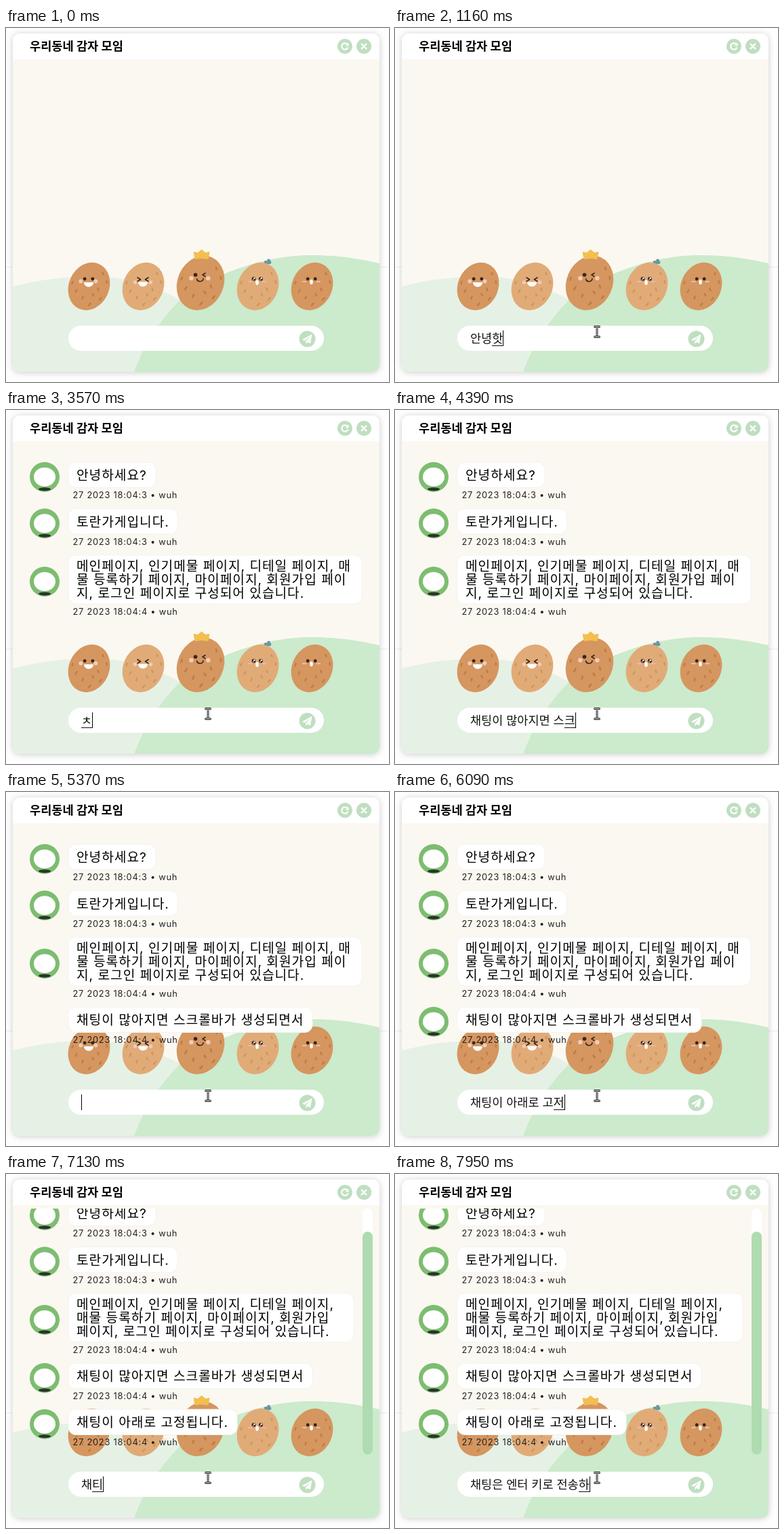
These frames come from a looping animation (565 px wide and 522 px high, 8 s). An HTML page:

```html
<!DOCTYPE html>
<html lang="ko">
<head>
<meta charset="utf-8">
<title>우리동네 감자 모임</title>
<style>
  html, body { margin: 0; width: 100%; height: 100%; overflow: hidden; background: #fefefe; }
  body { position: relative; font-family: Inter, "Noto Sans CJK KR", "Noto Sans CJK", sans-serif; }
  svg { position: absolute; left: 0; top: 0; display: block; }
  .title { font-size: 17.6px; font-weight: 700; }
  .message { font-size: 19.2px; letter-spacing: .05em; }
  .time { font-size: 12.8px; letter-spacing: .06em; fill: #222; }
  .panel { filter: drop-shadow(0 1px 5px rgba(0, 0, 0, .2)); }
  #entry {
    position: absolute; left: 111px; top: 446px; width: 316px; height: 23px;
    display: flex; overflow: hidden; white-space: pre;
    font-size: 17.5px; line-height: 23px; color: #111;
  }
  #entry span { flex: none; height: 23px; box-sizing: border-box; }
  #composing { border-bottom: 1px solid #111; }
  #caret { width: 1px; background: #000; }
</style>
</head>
<body>
<svg width="565" height="522" viewBox="0 0 565 522">
  <defs>
    <clipPath id="panelClip"><rect x="10" y="8" width="541" height="499" rx="11"/></clipPath>
    <clipPath id="chatClip"><rect x="10" y="51" width="541" height="363"/></clipPath>
    <ellipse id="potato" rx="29.800" ry="36.200" transform="rotate(24)"/>
    <path id="specks" fill="none" stroke-width="2.400" stroke-linecap="round"
      d="M-24,-7l-1,3M-18,5l-2,3.500M-9,15l-1,3M5,11l1.500,2.500M13,3l1,3M26,-8l.500,3M20,-20l1,2.500M18,17l-2.500,3M2,25l-2.500,3"/>
  </defs>
  <path d="M0,352.500H565" stroke="#ededed"/>
  <rect class="panel" x="10" y="8" width="541" height="499" rx="11" fill="#fbf8f1"/>
  <g clip-path="url(#panelClip)">
    <path fill="#e6f1e5" d="M10,381C60,368 105,366 140,367S215,377 265,405V507H10Z"/>
    <path fill="#cceacc" d="M189,507C204,466 226,433 253,405S365,335 450,335C490,335 520,340 551,347V507Z"/>
    <rect x="10" y="8" width="541" height="38" fill="#fff"/>
  </g>
  <text class="title" x="35" y="33">우리동네 감자 모임</text>
  <g fill="#bfdfc0">
    <circle cx="500" cy="27" r="11"/><circle cx="528" cy="27" r="11"/>
  </g>
  <g fill="none" stroke="#fff" stroke-width="2.200">
    <path d="M503.500,23.800A4.700,4.700 0 1 0 504.500,28.500"/>
    <path d="M524.700,23.700l6.600,6.600m0,-6.600l-6.600,6.600" stroke-width="2.400" stroke-linecap="round"/>
  </g>
  <path d="M505.500,21.500v5h-5z" fill="#fff"/>
  <g id="potatoes"></g>
  <g clip-path="url(#chatClip)"><g id="chat"></g></g>
  <g id="scrollbar">
    <rect x="526" y="51" width="15" height="363" rx="7.500" fill="#fff"/>
    <rect id="thumb" x="526" y="51" width="15" height="329" rx="7.500" fill="#afdbb0"/>
  </g>
  <rect x="92" y="439" width="377" height="37" rx="18.500" fill="#fff"/>
  <circle cx="444.500" cy="458.500" r="12" fill="#bfdfc0"/>
  <path fill="#fff" d="M451.500,451.500L437,459.500L440.500,461.300L448.500,454.500L442.200,462.300V466L444.500,463.300L449,465.300Z"/>
</svg>

<div id="entry"><span id="typed"></span><span id="composing"></span><span id="caret"></span></div>

<svg width="565" height="522" viewBox="0 0 565 522">
  <g id="pointer" fill="none">
    <path d="M-4.500,-7.500H-1L0,-6.500L1,-7.500H4.500M0,-6.500V6.500M-4.500,7.500H-1L0,6.500L1,7.500H4.500" stroke="#000" stroke-width="2.800"/>
    <path d="M-4,-7.500H4M0,-6.500V6.500M-4,7.500H4" stroke="#fff" stroke-width="1"/>
  </g>
</svg>

<script>
const LOOP = 8000;
const $ = id => document.getElementById(id);

// Potatoes
const DARK = ['#d59660', '#bf7d43'], LIGHT = ['#e1ab78', '#cf965c'];
const INK = '#35251d', BLUSH = '#f5c9b5', SPRIG = '#6896a0';
const dot = (x, y, r, fill) => `<circle cx="${x}" cy="${y}" r="${r}" fill="${fill}"/>`;
const line = (d, color = INK, width = 1.6) =>
  `<path d="${d}" fill="none" stroke="${color}" stroke-width="${width}" stroke-linecap="round" stroke-linejoin="round"/>`;
const pair = (x, y, r, fill, gap) => dot(x - gap, y, r, fill) + dot(x + gap, y, r, fill);
const grin = (x, y) => `<path d="M${x - 7},${y}h14c0,9 -14,9 -14,0z" fill="#fff"/>`;
const gasp = (x, y) => `<ellipse cx="${x}" cy="${y}" rx="2.300" ry="3.800" fill="#fff"/>`;
const dashes = (x, y, color) => line(`M${x - 12.5},${y}h4.500m16,0h4.500`, color, 2);

function potato(x, y, scale, [skin, speck]) {
  return `<g transform="translate(${x} ${y}) scale(${scale})">
    <use href="#potato" fill="${skin}"/><use href="#specks" stroke="${speck}"/></g>`;
}

$('potatoes').innerHTML = [
  potato(122.5, 381, 1, DARK),
  pair(121.3, 373.5, 3, BLUSH, 11), pair(122, 370, 2.4, INK, 5.8), grin(122, 375),

  potato(202.5, 381, 1, LIGHT),
  pair(202, 375, 2.7, BLUSH, 11.5),
  line('M194,368l4.500,2.800l-4.500,2.800M210,368l-4.500,2.800l4.500,2.800'), grin(202, 374.5),

  potato(287, 376, 1.14, DARK),
  '<path d="M277,330.500L283,331.500L288.500,327L294,331.500L300,330.500L298,340.500Q288.500,338.500 279,340.500Z" fill="#f3bf50" stroke="#f3bf50" stroke-linejoin="round"/>',
  pair(285.8, 369, 3.2, BLUSH, 12.5), dot(279.5, 364, 2.8, INK),
  line('M294,361.500l-4,2.500l4,2.500M281.500,370c1,5 9,5 9.500,-.500'),

  line('M386,350l.500,-5', SPRIG, 2),
  pair(386, 345.5, 2.6, SPRIG, 2.7), dot(387.5, 343, 2.4, SPRIG),
  potato(371.5, 381, 1, LIGHT),
  pair(370.7, 370, 3, INK, 5.2), pair(371.5, 369, 1.3, '#fff', 5.2), pair(369.8, 371.4, .8, '#fff', 5.2),
  dashes(370.5, 374, '#f3b5ac'), gasp(370.5, 375.3),

  potato(451.5, 381, 1, DARK),
  pair(450.7, 370, 2.4, INK, 5.5), dashes(450.5, 374, '#f0bfa4'), gasp(450.5, 374.5)
].join('');

// Messages
const INTRO = '메인페이지, 인기메물 페이지, 디테일 페이지, 매|물 등록하기 페이지, 마이페이지, 회원가입 페이|지, 로그인 페이지로 구성되어 있습니다.';
const INTRO_NARROW = '메인페이지, 인기메물 페이지, 디테일 페이지,|매물 등록하기 페이지, 마이페이지, 회원가입|페이지, 로그인 페이지로 구성되어 있습니다.';
const AVATAR_DELAY = 200, SCROLLBAR_AT = 6660, SCROLL_AT = 6790, SCROLL_BY = 38;

const messages = [
  { at: 1830, y: 77, width: 129, second: 3, text: '안녕하세요?' },
  { at: 2760, y: 145.5, width: 161, second: 3, text: '토란가게입니다.' },
  { at: 3300, until: SCROLLBAR_AT, y: 214, width: 433, second: 4, text: INTRO },
  { at: SCROLLBAR_AT, loaded: true, y: 214, width: 421, second: 4, text: INTRO_NARROW },
  { at: 5240, y: 317, width: 360, second: 4, text: '채팅이 많아지면 스크롤바가 생성되면서' },
  { at: 6660, y: 385, width: 249, second: 4, text: '채팅이 아래로 고정됩니다.' }
];

function messageMarkup({ y, width, second, text }) {
  const lines = text.split('|');
  const height = lines.length > 1 ? 72 : 37.5;
  const first = y + (lines.length > 1 ? 23 : 26);
  const avatarY = y + height / 2 + 3;
  return `<g>
    <g class="avatar">
      <circle cx="57" cy="${avatarY}" r="22" fill="#7dbd70"/>
      <ellipse cx="57" cy="${avatarY + 18}" rx="9" ry="2.500" fill="#2b332b"/>
      <ellipse cx="57" cy="${avatarY}" rx="16" ry="14" fill="#fff"/>
    </g>
    <rect x="92" y="${y}" width="${width}" height="${height}" rx="11" fill="#fff" stroke="#f2f4ef"/>
    ${lines.map((s, i) => `<text class="message" x="104" y="${first + i * 20}">${s}</text>`).join('')}
    <text class="time" x="98.500" y="${y + height + 15.5}">27 2023 18:04:${second} • wuh</text></g>`;
}
$('chat').innerHTML = messages.map(messageMarkup).join('');
messages.forEach((m, i) => {
  m.node = $('chat').children[i];
  m.avatar = m.node.querySelector('.avatar');
});

// Korean keyboard: every keystroke of a text, as finished part and syllable being composed
const LEADS = 'ㄱㄲㄴㄷㄸㄹㅁㅂㅃㅅㅆㅇㅈㅉㅊㅋㅌㅍㅎ';
const TAILS = ' ㄱㄲㄳㄴㄵㄶㄷㄹㄺㄻㄼㄽㄾㄿㅀㅁㅂㅄㅅㅆㅇㅈㅊㅋㅌㅍㅎ';
const TAIL_PAIRS = { 'ㄴㅎ': 'ㄶ', 'ㄹㅂ': 'ㄼ' };
const HANGUL = 0xac00, VOWEL_O = 8, VOWEL_OE = 11, TAIL_N = 4, TAIL_NH = 6;
const syllable = (lead, vowel, tail = 0) => String.fromCharCode(HANGUL + (lead * 21 + vowel) * 28 + tail);

function keystrokes(text) {
  const stages = [];
  let done = '';
  for (const char of text) {
    const code = char.charCodeAt(0) - HANGUL;
    if (code < 0) {
      stages.push([done + char, '']);
    } else {
      const lead = Math.floor(code / 588), vowel = Math.floor(code / 28) % 21, tail = code % 28;
      const previous = done ? done.charCodeAt(done.length - 1) - HANGUL : -1;
      const previousTail = previous < 0 ? 0 : previous % 28;
      const joined = previousTail ? TAIL_PAIRS[TAILS[previousTail] + LEADS[lead]] : LEADS[lead];
      const joinedTail = previous >= 0 && joined ? TAILS.indexOf(joined) : -1;
      stages.push(joinedTail > 0
        ? [done.slice(0, -1), String.fromCharCode(HANGUL + previous - previousTail + joinedTail)]
        : [done, LEADS[lead]]);
      if (vowel === VOWEL_OE) stages.push([done, syllable(lead, VOWEL_O)]);
      stages.push([done, syllable(lead, vowel)]);
      if (tail === TAIL_NH) stages.push([done, syllable(lead, vowel, TAIL_N)]);
      if (tail) stages.push([done, char]);
    }
    done += char;
  }
  return stages;
}

// Entry field timeline; marks are [keystroke number, time]
const entries = [];
const show = (at, typed, composing = '') => entries.push({ at, typed, composing });
function type(text, ...marks) {
  keystrokes(text).forEach(([typed, composing], i) => {
    const next = Math.max(1, marks.findIndex(([n]) => n >= i + 1));
    const [n0, t0] = marks[next - 1], [n1, t1] = marks[next];
    show(t0 + (t1 - t0) * (i + 1 - n0) / (n1 - n0), typed, composing);
  });
}
show(0, '');
type('안녕하세요 ', [1, 730], [13, 1350]);
show(1550, '안녕하세요');
show(1610, '안녕하세요?');
show(1830, '');
type('토란가게입니다.', [1, 1900], [8, 2280], [17, 2630]);
show(2760, '');
show(3050, INTRO.replaceAll('|', ''));
show(3300, '');
type('채팅이 많아지면 스크롤바가 생성되면서', [1, 3570], [22, 4320], [24, 4390], [46, 5180]);
show(5240, '');
type('채팅이 아래로 고정됩니다.', [1, 5430], [18, 6030], [19, 6060], [29, 6500]);
show(6660, '');
type('채팅은 엔터 키로 전송하', [1, 6990], [13, 7450], [14, 7480], [28, 7950]);

const pointerStops = [[60, 333, 466], [100, 318, 452], [135, 304, 441], [170, 299, 444], [210, 298, 448]];
const toggle = (node, visible) => { node.style.display = visible ? '' : 'none'; };

function draw(t) {
  for (const m of messages) {
    toggle(m.node, t >= m.at && t < (m.until ?? LOOP));
    toggle(m.avatar, m.loaded || t >= m.at + AVATAR_DELAY);
  }
  const scrolled = t >= SCROLL_AT;
  $('chat').setAttribute('transform', `translate(0 ${scrolled ? -SCROLL_BY : 0})`);
  toggle($('scrollbar'), t >= SCROLLBAR_AT);
  $('thumb').setAttribute('y', scrolled ? 85 : 51);

  const entry = entries.findLast(e => e.at <= t + .01);
  $('typed').textContent = entry.typed;
  $('composing').textContent = entry.composing;
  toggle($('composing'), entry.composing);
  const caretOn = (t >= 120 && t < 440) || (t >= 730 && t < 6660) || t >= 6990;
  $('caret').style.visibility = caretOn ? 'visible' : 'hidden';
  $('entry').scrollLeft = $('entry').scrollWidth;

  const stop = pointerStops.findLast(([at]) => at <= t);
  toggle($('pointer'), stop);
  if (stop) $('pointer').setAttribute('transform', `translate(${stop[1]} ${stop[2]})`);
}

const start = performance.now();
function frame() {
  draw((performance.now() - start) % LOOP);
  requestAnimationFrame(frame);
}
frame();
</script>
</body>
</html>
```
